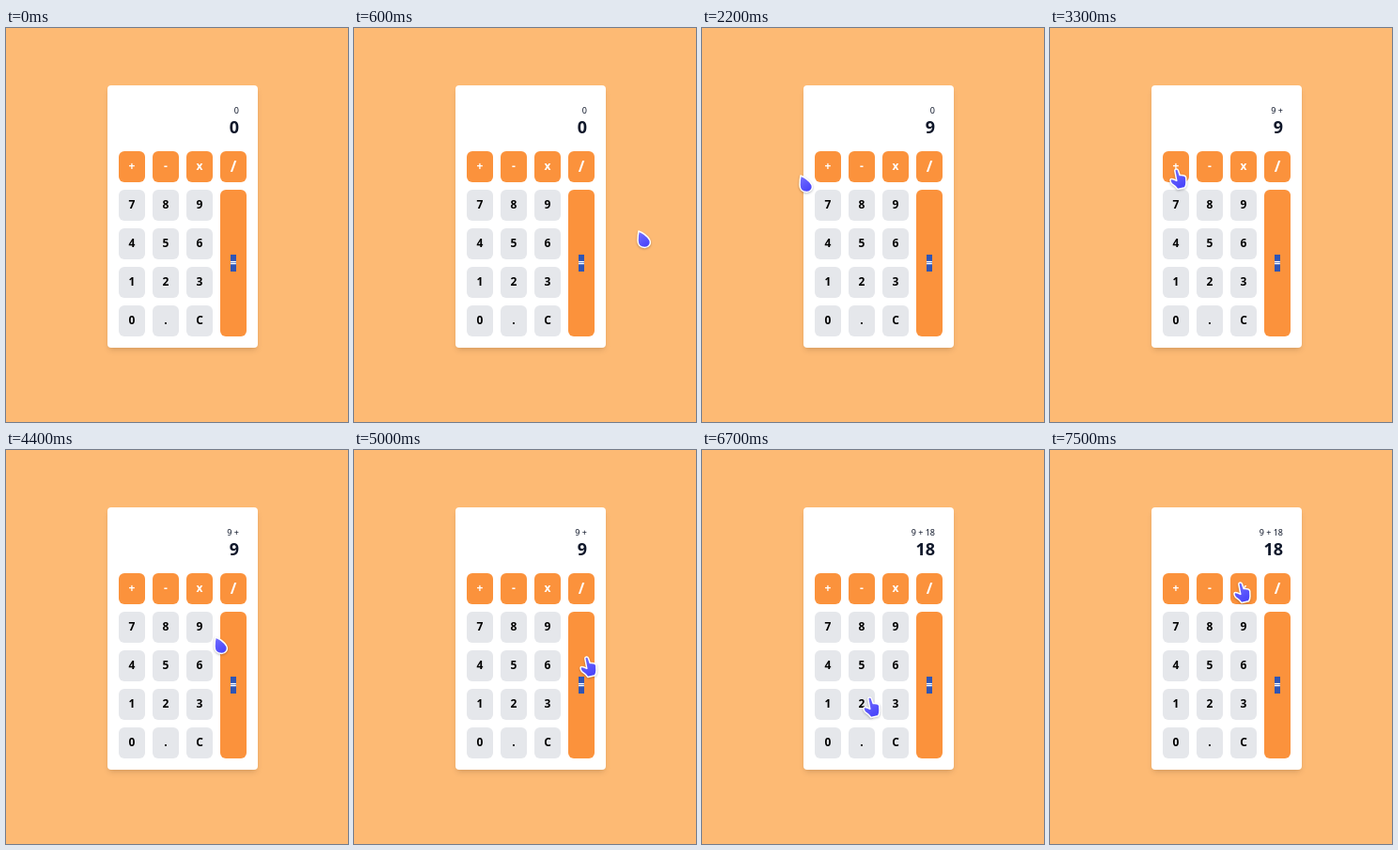
Recreate the animation shown at these times as an HTML page. Size 364 by 419 pixels, loop 8 s.

```html
<!DOCTYPE html>
<html lang="en">
<head>
<meta charset="utf-8">
<title>Calculator</title>
<style>
  html, body { margin: 0; width: 100%; height: 100%; overflow: hidden; background: #fdba74; }
  .card { position: absolute; left: 108px; top: 61px; width: 160px; height: 279px; border-radius: 4px;
    background: #fff; box-shadow: 0 4px 6px -1px rgba(0,0,0,.1), 0 2px 4px -2px rgba(0,0,0,.1);
    font: bold 12px "Noto Sans", "Open Sans", sans-serif; }
  .line { position: absolute; right: 20px; color: #0f172a; white-space: pre; }
  #sum { top: 20px; font-size: 9px; font-weight: 400; line-height: 13px; }
  #result { top: 32px; font-size: 18px; line-height: 24px; }
  #keys { position: absolute; left: 12px; top: 70px; display: grid; gap: 8px;
    grid: repeat(5, 33px) / repeat(4, 28px); }
  .key { border-radius: 6px; background: #e5e7eb; text-align: center; line-height: 31px; }
  .orange { background: #fb923c; color: #fff; }
  .slash { font-size: 16px; font-weight: 600; line-height: 32px; }
  .equals { grid-area: 2 / 4 / 6 / 5; display: grid; place-content: center; line-height: 18px; }
  .equals span { background: #2f55b5; }
  svg { position: absolute; left: 0; top: 0; width: 100%; height: 100%; }
  #cursor { filter: drop-shadow(0 1px 1px rgba(0,0,0,.25)); }
  #cursor path { fill: url(#ink); stroke: #fff; stroke-width: 1.5; stroke-linejoin: round; }
</style>
</head>
<body>
<div class="card">
  <div class="line" id="sum"></div>
  <div class="line" id="result"></div>
  <div id="keys"></div>
</div>
<svg>
  <defs>
    <linearGradient id="ink" x1="0" y1="0" x2=".5" y2="1">
      <stop offset="0" stop-color="#7672ff"/>
      <stop offset="1" stop-color="#4a45fa"/>
    </linearGradient>
  </defs>
  <g id="cursor">
    <path id="hand" d="M-2.2 1.8C-2.2-.2.6-.6 1.4 1.2L3.2 6.6C6 6.4 9.4 7 9.8 9.2L10 14.5Q10 17.5 8.5 19.8L1 21.6Q-1.5 18-5.5 15.6-8 12.2-6.4 10.6-4.6 10-.2 12.4Z"/>
    <path id="drop" d="M1 0C6 2 10 5 12.5 9 15 13.5 11.5 17.5 7.5 17.5 2.5 17.5 0 14 0 10 0 6 .3 3 1 0Z"/>
  </g>
</svg>
<script>
const LOOP = 8000, STEP = 100, APPEAR = 300;
const byId = id => document.getElementById(id);

const styles = { '/': 'orange slash', '=': 'orange equals' };
byId('keys').innerHTML = [...'+-x/=7894561230.C'].map(label => {
  const style = styles[label] || ('+-x'.includes(label) ? 'orange' : '');
  return `<div class="key ${style}"><span>${label}</span></div>`;
}).join('');
const keyBoxes = [...document.querySelectorAll('.key')].map(key => key.getBoundingClientRect());

// Pointer moves: start, end, x, y
const entry = [336, 229];
const moves = [
  [300, 1200, 204, 180],
  [1900, 2200, 104, 157], [2200, 2400, 135, 150],
  [3300, 3800, 209, 193],
  [4300, 4600, 258, 218], [4900, 5000, 248, 220],
  [6000, 6700, 179, 263], [6700, 6900, 188, 260], [6900, 7500, 203, 141]
];

function pointerAt(t) {
  let [x, y] = entry;
  for (const [start, end, toX, toY] of moves) {
    const p = Math.min(1, Math.max(0, (t - start) / (end - start)));
    const eased = p * p * (3 - 2 * p);
    x += (toX - x) * eased;
    y += (toY - y) * eased;
  }
  return [Math.round(x), Math.round(y)];
}

// The hand's hot spot lies a little right of its fingertip.
const overKey = (x, y) => keyBoxes.some(box =>
  x >= box.left - 3 && x < box.right && y >= box.top && y < box.bottom);
const show = (id, visible) => byId(id).setAttribute('visibility', visible ? 'visible' : 'hidden');

function draw(now) {
  const t = Math.floor(now % LOOP / STEP) * STEP;
  byId('sum').textContent = t < 3300 ? '0' : t < 5700 ? '9 +' : '9 + 18';
  byId('result').textContent = t < 1600 ? '0' : t < 5700 ? '9' : '18';

  const [x, y] = pointerAt(t), over = overKey(x, y), visible = t >= APPEAR;
  byId('cursor').setAttribute('transform', `translate(${x} ${y})`);
  show('hand', visible && over);
  show('drop', visible && !over);
  requestAnimationFrame(draw);
}
requestAnimationFrame(draw);
</script>
</body>
</html>
```
